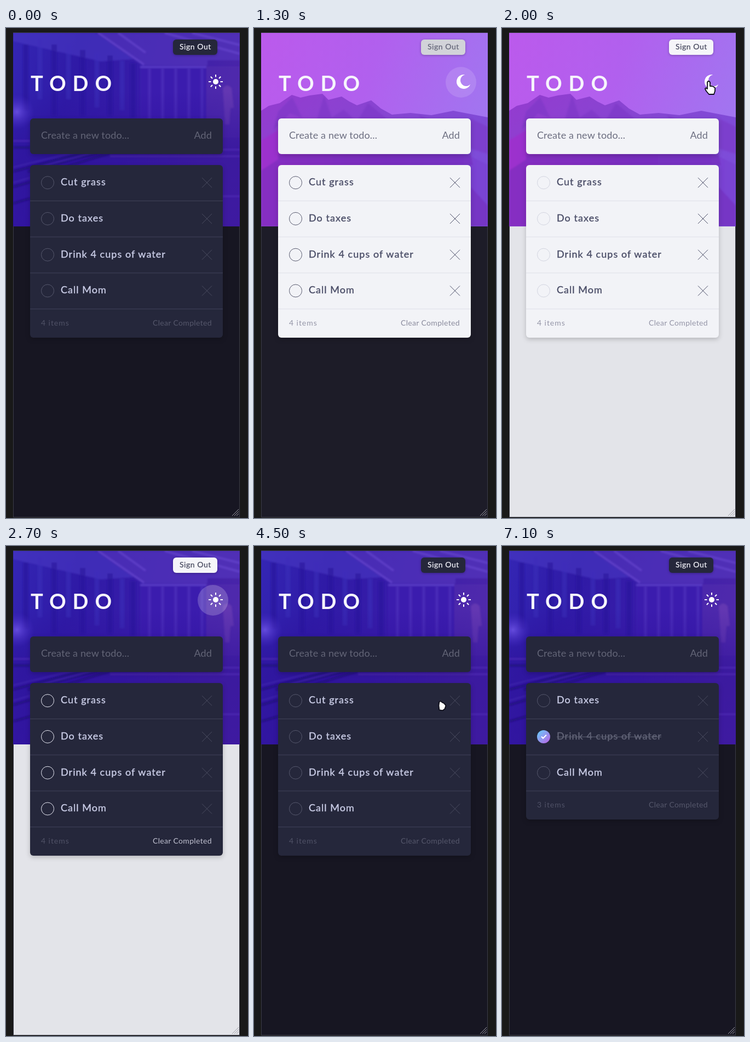
Animation, 442 px wide and 894 px high, one loop 7.2 s. Source, as an HTML page:

```html
<!DOCTYPE html>
<html lang="en">
<head>
<meta charset="utf-8">
<title>Todo</title>
<style>
html, body { margin: 0; width: 100%; height: 100%; overflow: hidden; background: #191919; }
svg { display: block; width: 442px; height: 894px; font-family: Lato, "Open Sans", sans-serif; font-size: 18px;
  --card: #25273b; --text: #cbcee8; --hint: #636577; --line: #40425a; --cross: #4a4c60; --count: #505267; }
svg.light { --card: #f2f3f7; --text: #494c66; --hint: #6c6e80; --line: #dfe0e8; --cross: #494c66; --count: #9495a7; }
.day, .light .night { display: none; }
.light .day { display: inline; }
.card { fill: var(--card); filter: drop-shadow(0 3px 4px #0003); }
.hint { fill: var(--hint); letter-spacing: .15px; }
.item { fill: var(--text); stroke: var(--text); stroke-width: .35; letter-spacing: 1.05px; }
.rule { stroke: var(--line); }
.cross { stroke: var(--cross); fill: none; }
.small { font-size: 14px; }
.end { text-anchor: end; }
.ring { fill: none; stroke: var(--ring); }
.done .ring, .tick, .strike { display: none; }
.done .tick, .done .strike { display: inline; }
.done .item { fill: #626477; stroke: #626477; }
.strike { stroke: #626477; stroke-width: 1.2; }
</style>
</head>
<body>
<svg id="app" viewBox="0 0 442 894">
  <defs>
    <clipPath id="hero"><rect x="13" y="9" width="414" height="353"/></clipPath>
    <linearGradient id="hall" x2="1" y2=".25"><stop stop-color="#3426b4"/><stop offset=".3" stop-color="#2f1aa6"/><stop offset=".6" stop-color="#371ca9"/><stop offset="1" stop-color="#4925a9"/></linearGradient>
    <linearGradient id="shade" x2="0" y2="1"><stop offset=".3" stop-color="#2a0d98" stop-opacity="0"/><stop offset=".6" stop-color="#2d0f94" stop-opacity=".5"/><stop offset="1" stop-color="#330f98" stop-opacity=".5"/></linearGradient>
    <radialGradient id="lamp"><stop stop-color="#7157e8" stop-opacity=".8"/><stop offset="1" stop-color="#4c30cc" stop-opacity="0"/></radialGradient>
    <linearGradient id="sky" x2="1" y2=".3"><stop stop-color="#bb5aec"/><stop offset=".5" stop-color="#b160ee"/><stop offset="1" stop-color="#a274f0"/></linearGradient>
    <linearGradient id="far" x2="1" y2=".6"><stop stop-color="#943bcf"/><stop offset=".5" stop-color="#8646d2"/><stop offset="1" stop-color="#7c4dda"/></linearGradient>
    <linearGradient id="near" x2="1"><stop stop-color="#a02fcd"/><stop offset=".5" stop-color="#812fc4"/><stop offset="1" stop-color="#7843d4"/></linearGradient>
    <linearGradient id="check" x2="1" y2="1"><stop stop-color="#63d0fb"/><stop offset="1" stop-color="#bd60e4"/></linearGradient>
    <filter id="soft"><feGaussianBlur stdDeviation="1.8"/></filter>
  </defs>
  <rect width="442" height="894" fill="#191919"/>
  <rect id="page" x="13.5" y="8.5" width="413" height="884" stroke="#3a3b47"/>

  <g clip-path="url(#hero)">
    <g class="night">
      <path fill="url(#hall)" d="M13 9h414v353H13z"/>
      <g filter="url(#soft)">
        <path fill="#4a37c4" opacity=".6" d="M13 9h150l70 48-60 4L13 24z"/>
        <path fill="#5535bd" opacity=".65" d="M165 9h262v50H368V68H250z"/>
        <path fill="none" stroke="#6a4ad0" stroke-width="4" opacity=".6" d="M168 9l84 58M205 9l50 36M290 9l137 38M340 9l87 22"/>
        <path fill="none" stroke="#2a149c" stroke-width="10" opacity=".6" d="M36 30v120M88 30v130M140 40v120M190 50v110M232 64v100"/>
        <path fill="none" stroke="#3d2fbb" stroke-width="8" opacity=".55" d="M62 20v110M114 30v100M166 45v100M212 60v90"/>
        <path fill="#3a1fae" d="M245 72h120v96H245z"/>
        <path fill="none" stroke="#6142cb" stroke-width="4" opacity=".75" d="M245 71h121"/>
        <path fill="none" stroke="#5334bd" stroke-width="5" opacity=".65" d="M262 74v92M286 74v92M310 74v92M334 74v92M358 74v92"/>
        <path fill="#5a30b0" opacity=".4" d="M366 70h61v130h-61z"/>
        <path fill="#7646b8" opacity=".5" d="M396 110q8-10 16 0l4 36h-6l-2 30h-8z"/>
      </g>
      <path fill="url(#shade)" d="M13 9h414v353H13z"/>
      <g filter="url(#soft)" fill="none">
        <path stroke="#5534bd" stroke-width="3" opacity=".6" d="M13 206h31M190 234h237M396 222h31M396 307h31"/>
        <path stroke="#1f0a78" stroke-width="4" opacity=".7" d="M13 218h31M13 262l150-40M40 262l150-40M80 262l130-40M13 290l31-9M13 320l31-9"/>
        <path stroke="#4a2cb4" stroke-width="2" opacity=".6" d="M13 254l140-34M50 256l140-36M13 282l31-9"/>
      </g>
      <circle cx="20" cy="153" r="32" fill="url(#lamp)"/>
    </g>
    <g class="day">
      <path fill="url(#sky)" d="M13 9h414v353H13z"/>
      <path fill="url(#far)" d="M13 151l14-9 20-5 22-15 16 5 17-4 23-3 11 11 24-6 14 9 14 7 26-9 18 15 20 11 34-3 38 4 40-8 63 12v199H13z"/>
      <g filter="url(#soft)">
        <path fill="#7a38c5" opacity=".55" d="M70 126l18 38-22-8-30 30 8-34zM128 123l14 40 22-14 24 22 20-34 34 28-56 20-76-2zM300 158l48 22 50-14 29 14v50l-90-28z"/>
        <path fill="url(#near)" opacity=".85" d="M13 205l50-30 50 20 70-16 70 38 90-8 84 40v113H13z"/>
        <path fill="#7229b8" opacity=".5" d="M13 260l31-20v122H13zM44 230h352l4 20H44zM396 290l31 34v38h-31z"/>
      </g>
    </g>
  </g>

  <text x="45" y="114.5" font-size="38" font-weight="700" letter-spacing="12" fill="#f6f5fc">TODO</text>
  <rect x="305" y="21" width="81" height="28" rx="6" fill="var(--btn)" style="filter:drop-shadow(0 1px 2px #0004)"/>
  <text class="small" x="317" y="39" letter-spacing=".55" fill="var(--label)" stroke="var(--label)" stroke-width=".25">Sign Out</text>
  <circle id="ripple" cx="378" cy="99" fill="#fff"/>
  <g class="night" stroke="#fff" stroke-width="2" transform="translate(383 98)">
    <circle r="5" fill="#fff" stroke="none"/><g id="rays"></g>
  </g>
  <path class="day" fill="#fff" transform="translate(370 85)" d="M15.4 .2A10.5 10.5 0 1 0 25.1 17.7A13 13 0 1 1 15.4 .2z"/>

  <rect class="card" x="44" y="165" width="352" height="65" rx="6"/>
  <text class="hint" x="64" y="202">Create a new todo...</text>
  <text class="hint end" x="376" y="202">Add</text>

  <rect class="card" id="list" x="44" y="250" width="352" rx="6"/>
  <g id="rows"></g>
  <g id="footer" class="small">
    <text id="count" x="64" y="543" letter-spacing=".95" fill="var(--count)"></text>
    <text class="end" x="376" y="543" letter-spacing=".35" fill="var(--clear)">Clear Completed</text>
  </g>

  <path stroke="#a0a0a8" d="M413 890l12-12M417 890l8-8M421 890l4-4"/>
  <g id="cursor" fill="#fff" stroke="#0c0c18" stroke-width="1.8" stroke-linejoin="round">
    <path id="point" d="M-2 1Q0-3 3 1V8l3 0 3 1 3 2v6l-2 6H1l-5-6-2-4q1-3 4 0z"/>
    <path id="fist" d="M-4-7q3-2 5 1l4 2 3 4-2 6-4 3-6-1-1-8z"/>
  </g>
</svg>
<script>
const LOOP = 7200, STEP = 100, ROW = 65.75;
const TO_LIGHT = 1200, TO_DARK = 2700, REMOVE = 5300, CHECK = 6200;
const $ = id => document.getElementById(id);
const app = $('app');
const clamp = v => Math.max(0, Math.min(1, v));
const smooth = p => p * p * (3 - 2 * p);

const path = [ // time, x, y
  [300, 442, 160], [1000, 377, 98], [2900, 377, 98], [3300, 227, 317], [3900, 215, 330],
  [4700, 366, 284], [5300, 366, 284], [5600, 349, 389], [6000, 77, 350], [6300, 77, 350],
  [6600, 280, 465], [6700, 303, 480], [6800, 303, 480], [7000, 319, 489]
];
const shown = [[300, 1200], [1500, 2600], [2900, 7100]];

$('rays').innerHTML = Array.from({ length: 8 }, (_, i) =>
  `<path d="M0-8.5V-13" transform="rotate(${i * 45})"/>`).join('');

$('rows').innerHTML = ['Cut grass', 'Do taxes', 'Drink 4 cups of water', 'Call Mom'].map(name => `<g>
  <circle class="ring" cx="76" cy="32.2" r="11.5"/>
  <g class="tick"><circle cx="76" cy="32.2" r="12" fill="url(#check)"/>
    <path d="M72 32l3 3 6-6" fill="none" stroke="#fff" stroke-width="2"/></g>
  <text class="item" x="100" y="37">${name}</text>
  <path class="strike" d="M100 32.5H291"/>
  <path class="cross" d="M358 23.2l18 18m0-18l-18 18"/>
  <path class="rule" d="M44 65.4H396"/></g>`).join('');
const rows = [...$('rows').children];

function mix(a, b, p) {
  const part = (hex, i) => parseInt(hex.slice(i, i + 2), 16);
  return `rgb(${[1, 3, 5].map(i => Math.round(part(a, i) + (part(b, i) - part(a, i)) * p))})`;
}

// How far the light theme has faded in
function lightness(t, duration, power) {
  const ease = start => clamp((t - start) / duration) ** power;
  return t < TO_DARK ? ease(TO_LIGHT) : 1 - ease(TO_DARK);
}

function cursorAt(t) {
  const next = path.findIndex(p => p[0] > t);
  if (next < 1) return (next ? path[path.length - 1] : path[0]).slice(1);
  const [a, b] = [path[next - 1], path[next]];
  const p = smooth((t - a[0]) / (b[0] - a[0]));
  return [1, 2].map(i => a[i] + (b[i] - a[i]) * p);
}

function drawTheme(t) {
  const slow = lightness(t, 600, 2), fast = lightness(t, 120, 1);
  const leaving = t >= TO_DARK;
  const set = (name, value) => app.style.setProperty(name, value);
  app.classList.toggle('light', t >= TO_LIGHT && t < TO_DARK);
  $('page').setAttribute('fill', mix('#171622', '#e3e4e9', slow));
  set('--btn', mix('#25273b', '#f5f5f9', fast));
  set('--label', mix('#f0f0f7', '#494b60', fast));
  set('--ring', mix('#55576c', leaving ? '#e6e7f2' : '#d3d5e0', slow));
  set('--clear', mix('#55576b', leaving ? '#c0c1d0' : '#9495a7', fast));

  const age = t - (t < 2000 ? 1000 : 2500);
  const on = age >= 0 && age < 500;
  $('ripple').setAttribute('r', 28 * clamp(.6 + age / 500));
  $('ripple').setAttribute('opacity', on ? .2 * clamp((500 - age) / 300) : 0);
}

function drawList(t) {
  const gone = t >= REMOVE ? 1 : 0;
  rows.forEach((row, i) => row.setAttribute('transform', `translate(0 ${250 + (i - gone) * ROW})`));
  rows[0].style.display = gone ? 'none' : '';
  rows[2].classList.toggle('done', t >= CHECK);
  $('list').setAttribute('height', 315 - gone * 66);
  $('footer').setAttribute('transform', `translate(0 ${-66 * gone})`);
  $('count').textContent = `${4 - gone} items`;
}

function drawCursor(t) {
  const [x, y] = cursorAt(t);
  const overList = y > 250;
  $('cursor').setAttribute('transform', `translate(${x} ${y})`);
  $('cursor').style.display = shown.some(([a, b]) => t >= a && t < b) ? '' : 'none';
  $('point').style.display = overList ? 'none' : '';
  $('fist').style.display = overList ? '' : 'none';
}

function render() {
  const t = Math.floor(performance.now() % LOOP / STEP) * STEP;
  drawTheme(t);
  drawList(t);
  drawCursor(t);
  requestAnimationFrame(render);
}
render();
</script>
</body>
</html>
```
